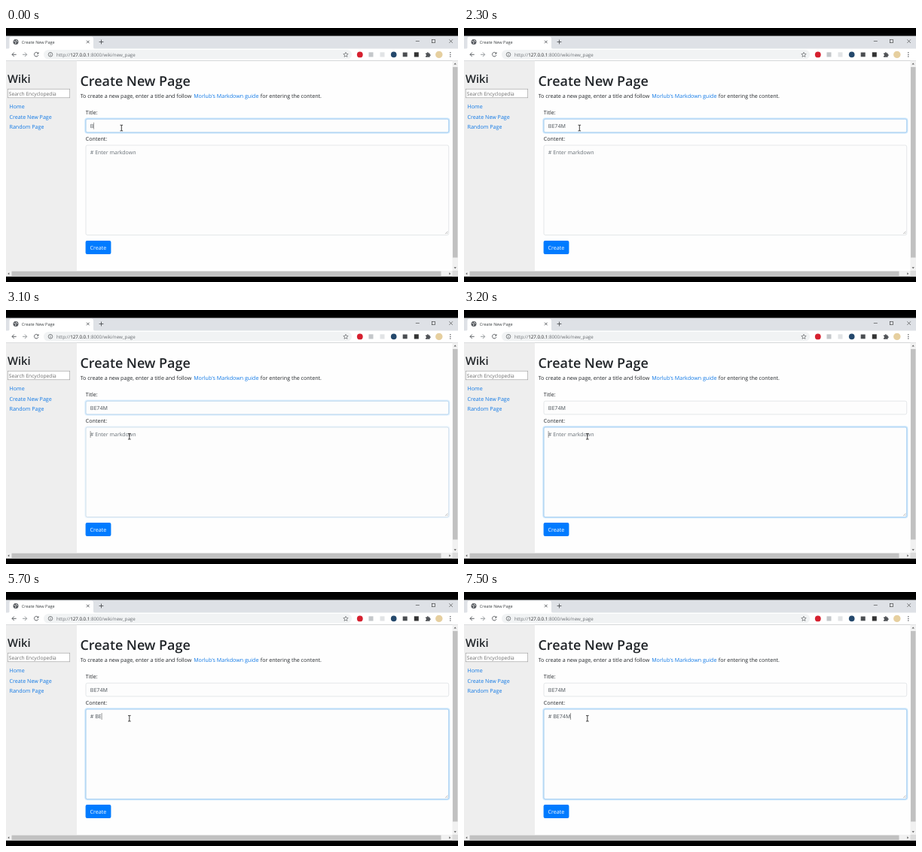
Recreate the animation shown at these times as an HTML page. Size 600 by 338 pixels, loop 8000 ms.

```html
<!DOCTYPE html>
<html lang="en">
<head>
<meta charset="utf-8">
<title>Create New Page</title>
<style>
  html, body { margin: 0; width: 100%; height: 100%; overflow: hidden; background: #000; }
  svg { display: block; width: 100vw; height: 100vh; }
  text {
    font: 7.12px "Open Sans", "Noto Sans", sans-serif;
    fill: #212529;
    text-rendering: geometricPrecision;
    white-space: pre;
  }
  .link { fill: #0f78e6; }
  .entry { fill: #495057; }
  .hint { fill: #656d74; font-size: 7.02px; }
  .line { fill: none; stroke: #505357; stroke-width: .9; }
  .field { fill: #fdfdfd; stroke: #d3d8dc; stroke-width: .6; }
  .ring { fill: none; stroke: #1f96f5; stroke-opacity: .22; stroke-width: 1.5; }
  .edge { fill: none; stroke: #8cc6fa; stroke-width: .6; }
  .caret { fill: #444; }
</style>
</head>
<body>
<svg viewBox="0 0 600 338" preserveAspectRatio="none">
  <rect width="600" height="338"/>

  <!-- tab strip -->
  <rect y="10.500" width="600" height="18" fill="#dee1e6"/>
  <path d="M2 28q2.500 0 2.500-2.500V14.500q0-3 3-3H113q3 0 3 3V25.500q0 2.500 2.500 2.500z" fill="#fff"/>
  <circle cx="13" cy="18.600" r="3.500" fill="#54585d"/>
  <path d="M10.500 17.400l2 .6.6 1.600-1 1.500M13.500 15.800l.3 1.400 1.700.8" fill="none" stroke="#fff" stroke-width=".8"/>
  <text x="20.800" y="20.700" style="font-size:5.55px;fill:#3c4043">Create New Page</text>
  <path class="line" d="M107 16.700l3.600 3.600m0-3.600l-3.600 3.600M123.600 18.500h5.800m-2.900-2.900v5.800"/>
  <g fill="none" stroke="#333" stroke-width=".6">
    <path d="M543.800 17.500h5M588.300 15.300l4.600 4.600m0-4.600l-4.600 4.600"/>
    <rect x="565.400" y="15.500" width="4.200" height="4.200"/>
  </g>

  <!-- toolbar -->
  <rect y="27.500" width="600" height="16" fill="#fff"/>
  <rect x="50" y="29" width="409" height="12.600" rx="6.300" fill="#f1f3f4"/>
  <path class="line" d="M13.700 35.300H8m2.800-2.800L8 35.300l2.800 2.800"/>
  <path class="line" d="M22 35.300h5.700m-2.800-2.800l2.800 2.800-2.800 2.800" style="stroke:#8d9195"/>
  <path class="line" d="M42.600 33.600a2.800 2.800 0 1 0 .3 2.500M43 32.200v2h-2"/>
  <circle class="line" cx="59" cy="35.300" r="2.800" style="stroke-width:.7"/>
  <path class="line" d="M59 34.900v1.900M59 33.500v.7" style="stroke-width:.7"/>
  <text x="67" y="37.600" style="font-size:6.2px;fill:#6a6e73">http://<tspan fill="#202124">127.0.0.1</tspan>:8000/wiki/new_page</text>
  <path class="line" d="M451 32.300l.9 2.100 2.300.2-1.800 1.500.6 2.300-2-1.200-2 1.200.6-2.300-1.800-1.500 2.300-.2z" style="stroke-width:.6"/>
  <circle cx="469.800" cy="35.400" r="3.900" fill="#d6202f"/>
  <rect x="481.500" y="32.300" width="6" height="6.200" fill="#c4c7ca"/>
  <rect x="496.500" y="32.300" width="6" height="6.200" fill="#e2e4e6"/>
  <circle cx="514.700" cy="35.400" r="3.800" fill="#24486c"/>
  <rect x="526.700" y="32.500" width="6" height="5.800" fill="#4a4d51"/>
  <rect x="541.800" y="32.300" width="6" height="6.200" fill="#333"/>
  <path d="M557 33.400h1.700a1.100 1.100 0 0 1 2.200 0h1.700v1.700a1.100 1.100 0 0 1 0 2.200v1.500H557v-1.600a1.100 1.100 0 0 0 0-2.200z" fill="#505357"/>
  <circle cx="574.800" cy="35.400" r="4.700" fill="#e6cf9f"/>
  <g fill="#505357">
    <circle cx="589.800" cy="32.800" r=".75"/><circle cx="589.800" cy="35.400" r=".75"/><circle cx="589.800" cy="38" r=".75"/>
  </g>

  <!-- page -->
  <rect y="43.500" width="600" height="287" fill="#fefefe"/>
  <rect y="43.500" width="94" height="279.500" fill="#eee"/>
  <rect y="43" width="600" height=".7" fill="#dfe1e4"/>
  <text x="2" y="73.300" style="font-size:14.8px;font-weight:600">Wiki</text>
  <rect x="2.300" y="81.200" width="82.400" height="11.600" fill="#fff" stroke="#999" stroke-width=".6"/>
  <text x="3.800" y="89.500" style="font-size:6.65px;fill:#6c6c6c">Search Encyclopedia</text>
  <text class="link" x="4.500" y="106.600">Home</text>
  <text class="link" x="4.500" y="120.600">Create New Page</text>
  <text class="link" x="4.500" y="134">Random Page</text>

  <text x="98.500" y="77" style="font-size:17.9px;font-weight:600">Create New Page</text>
  <text x="98.700" y="93.100">To create a new page, enter a title and follow</text>
  <text class="link" x="249.200" y="93.100">Morlub's Markdown guide</text>
  <text x="337.800" y="93.100">for entering the content.</text>
  <text x="105.800" y="114.500">Title:</text>
  <text x="105.800" y="150">Content:</text>

  <rect class="field" x="106" y="121.200" width="481.700" height="17.700" rx="2"/>
  <rect class="field" x="106" y="156" width="481.700" height="119.500" rx="2"/>
  <path d="M583 274l3.500-3.500M585 274l1.500-1.500" stroke="#888" stroke-width=".5"/>
  <g id="titleGlow">
    <rect class="ring" x="105.100" y="120.300" width="483.500" height="19.500" rx="2.800"/>
    <rect class="edge" x="106" y="121.200" width="481.700" height="17.700" rx="2"/>
  </g>
  <g id="bodyGlow">
    <rect class="ring" x="105.100" y="155.100" width="483.500" height="121.300" rx="2.800"/>
    <rect class="edge" x="106" y="156" width="481.700" height="119.500" rx="2"/>
  </g>
  <text class="entry" id="title" x="111.800" y="132.600"></text>
  <text class="hint" id="hint" x="111.800" y="168.400"># Enter markdown</text>
  <text class="entry" id="body" x="111.800" y="168.400"></text>
  <rect class="caret" id="titleCaret" y="125.700" width=".5" height="9"/>
  <rect class="caret" id="bodyCaret" y="161" width=".5" height="9"/>

  <rect x="105.600" y="283.100" width="33.800" height="17.900" rx="2" fill="#007bff"/>
  <text x="111.600" y="295" style="fill:#fff">Create</text>

  <!-- scrollbars -->
  <rect x="592.500" y="43.500" width="7.500" height="287" fill="#f1f1f1"/>
  <rect y="323" width="593" height="7.500" fill="#f1f1f1"/>
  <rect x="593" y="52" width="6.500" height="253.500" fill="#c1c1c1"/>
  <rect x="7.500" y="323.700" width="570" height="6.200" fill="#c1c1c1"/>
  <rect x="592.500" y="323" width="7.500" height="7.500" fill="#dcdcdc"/>
  <path d="M594.500 48.500l1.700-2 1.700 2zM594.500 318.300l1.700 2 1.700-2zM4.300 325.200l-2 1.700 2 1.700zM588.300 325.200l2 1.700-2 1.700z" fill="#606060"/>

  <path id="pointer" d="M-1.800-3.800h1.300q.5 0 .5.500q0-.5.500-.5h1.300M0-3.500v7M-1.800 3.800h1.300q.5 0 .5-.5q0 .5.500.5h1.300" fill="none" stroke="#111" stroke-width=".8"/>
</svg>
<script>
const LOOP = 8000, STEP = 100, CLICK = 3100;

// [start, text, caret shown]
const titleSteps = [
  [0, "B", 1], [100, "BE", 1], [700, "BE", 0], [800, "BE7", 1],
  [1100, "BE74", 1], [1600, "BE74", 0], [1800, "BE74M", 1],
  [2300, "BE74M", 0], [2800, "BE74M", 1], [CLICK, "BE74M", 0]
];
const bodySteps = [
  [0, "", 0], [CLICK, "", 1], [3600, "", 0], [4000, "#", 1], [4500, "#", 0],
  [4900, "# ", 1], [5300, "# B", 1], [5700, "# BE", 1], [6100, "# BE7", 1],
  [6500, "# BE74", 1], [7000, "# BE74", 0], [7500, "# BE74M", 1]
];
const move = { start: 2400, end: 3000, from: [153.3, 133], to: [163.8, 168.2] };

const $ = id => document.getElementById(id);
const clamp = v => Math.min(1, Math.max(0, v));
const ease = p => p * p * (3 - 2 * p);
const stepAt = (steps, t) => steps.findLast(s => s[0] <= t);

function showEntry(id, steps, t) {
  const [, text, on] = stepAt(steps, t);
  const el = $(id), caret = $(id + "Caret");
  el.textContent = text.replace(" ", "\u00a0");
  caret.setAttribute("x", 111.8 + (text ? el.getComputedTextLength() : 0));
  caret.setAttribute("opacity", on);
  return text;
}

function draw(t) {
  showEntry("title", titleSteps, t);
  const typed = showEntry("body", bodySteps, t);
  $("hint").setAttribute("opacity", typed ? 0 : 1);

  const focus = clamp((t - CLICK + 50) / 150);
  $("titleGlow").setAttribute("opacity", 1 - focus);
  $("bodyGlow").setAttribute("opacity", focus);

  const p = ease(clamp((t - move.start) / (move.end - move.start)));
  const [x, y] = move.from.map((v, i) => v + (move.to[i] - v) * p);
  $("pointer").setAttribute("transform", `translate(${x} ${y})`);
}

const origin = performance.now();
function tick() {
  const t = (performance.now() - origin) % LOOP;
  draw(Math.floor(t / STEP) * STEP);
  requestAnimationFrame(tick);
}
tick();
</script>
</body>
</html>
```
